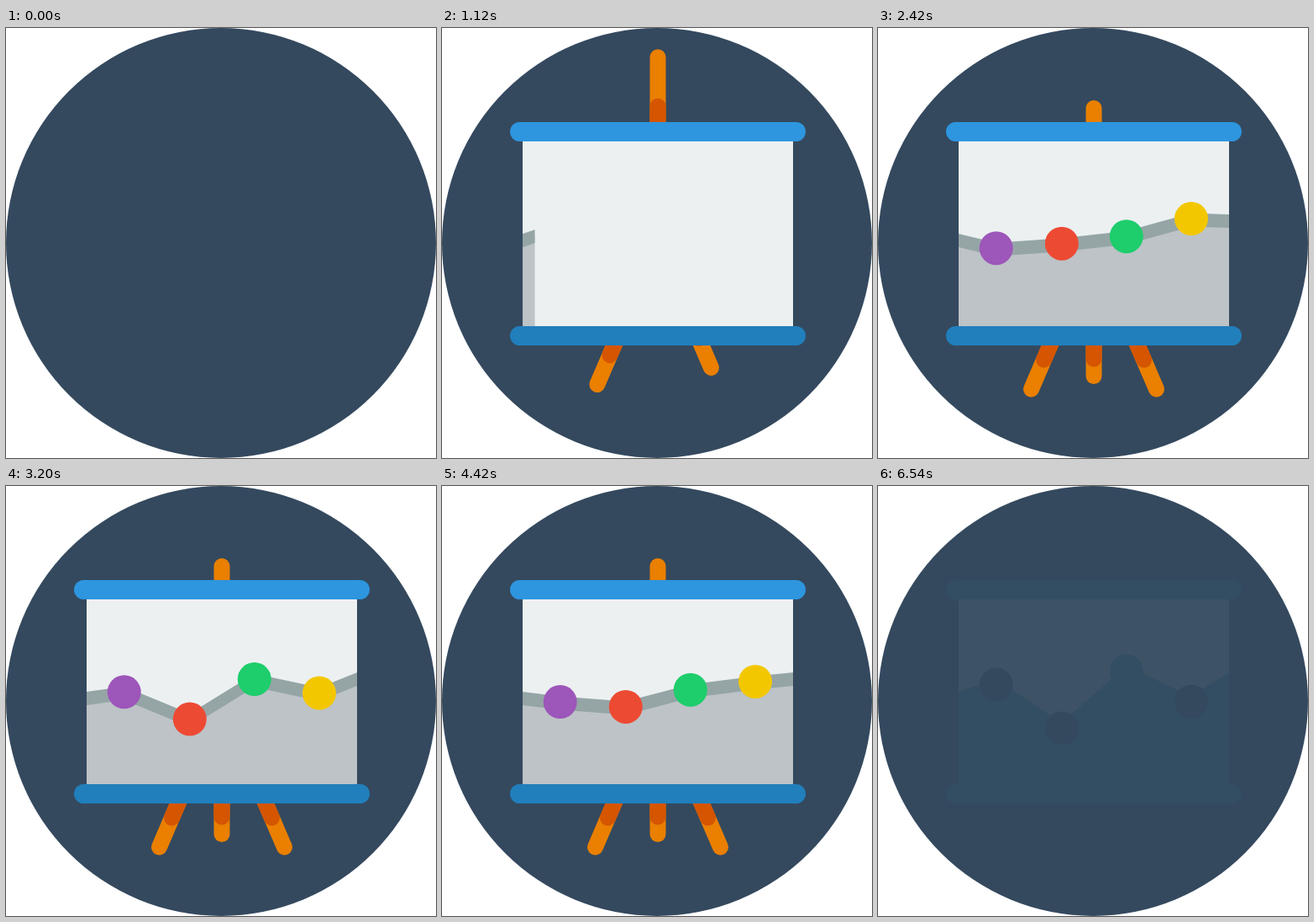
An HTML page with a canvas for the animation above (7.2 s loop, 512 px wide and 512 px high).

```html
<!DOCTYPE html>
<html lang="en">
<head>
<meta charset="utf-8">
<title>Presentation chart</title>
<style>
  html, body { margin: 0; width: 100%; height: 100%; overflow: hidden; background: #fff; }
  canvas { display: block; width: 512px; height: 512px; }
</style>
</head>
<body>
<canvas id="stage" width="512" height="512"></canvas>
<script>
const ctx = document.getElementById('stage').getContext('2d');
const LOOP = 7200, MID = 257, BG = '#34495e';
const FADE_START = 6000, FADE_TIME = 600, GHOST_START = 6540;

const FULL = {
  top: '#2d96df', bottom: '#217fbc', sheet: '#ecf0f1', area: '#bdc3c7', line: '#95a5a6',
  dots: ['#9d56b9', '#ed4a34', '#1ecd6b', '#f3c700']
};
// Faint remains of the board after the fade
const GHOST = {
  top: '#334e62', bottom: '#334e62', sheet: '#3e5266', area: '#334e62', line: '#334e62',
  dots: [BG, BG, '#334e62', BG]
};

// Rest position and swing of each chart point
const POINTS = [
  { x: 140.7, y: 236.5, swing: 50 },
  { x: 218.8, y: 288.5, swing: -62 },
  { x: 295.8, y: 220.5, swing: 54 },
  { x: 373, y: 256.8, swing: -58 }
];

// Legs: tip, far end, shaded span, sideways drift per pixel of rise
const LEGS = [
  { tip: [182.5, 430], far: [238.4, 300], shade: [[197.5, 395], [238.4, 300]], drift: 0.43 },
  { tip: [331.5, 430], far: [275.6, 300], shade: [[316.5, 395], [275.6, 300]], drift: -0.43 },
  { tip: [257, 414.5], far: [257, 95.5], shade: [[257, 394], [257, 154]], drift: 0 }
];

const span = (t, start, time) => Math.min(1, Math.max(0, (t - start) / time));
const backOut = p => 1 + 2.70158 * (p - 1) ** 3 + 1.70158 * (p - 1) ** 2;
const sineInOut = p => (1 - Math.cos(Math.PI * p)) / 2;

// Two swings there and back, slowing down over time
function swingAt(t) {
  const k = 1.77, p = span(t, 2240, 2830);
  const phase = 4 * (1 - Math.exp(-k * p)) / (1 - Math.exp(-k));
  return 1 - Math.abs(phase % 2 - 1);
}

function disc(x, y, r, color) {
  ctx.fillStyle = color;
  ctx.beginPath();
  ctx.arc(x, y, Math.max(0, r), 0, Math.PI * 2);
  ctx.fill();
}

function stick(a, b, width, color) {
  ctx.strokeStyle = color;
  ctx.lineWidth = width;
  ctx.lineCap = 'round';
  ctx.beginPath();
  ctx.moveTo(...a);
  ctx.lineTo(...b);
  ctx.stroke();
}

function polygon(points, color) {
  ctx.fillStyle = color;
  ctx.beginPath();
  points.forEach(p => ctx.lineTo(...p));
  ctx.closePath();
  ctx.fill();
}

function drawLegs(t) {
  LEGS.forEach((leg, i) => {
    const start = 770 + 141 * i;
    if (t < start) return;
    const rise = 83 * (1 - span(t, start, 470)) ** 2;
    ctx.save();
    ctx.translate(leg.drift * rise, -rise);
    stick(leg.tip, leg.far, 19, '#ea7f00');
    stick(...leg.shade, 19, '#d55500');
    ctx.restore();
  });
}

function drawChart(t, look) {
  const u = swingAt(t);
  const spots = POINTS.map(p => [p.x, p.y + p.swing * u]);
  const path = [[96, 253], ...spots.map(([x, y]) => [x, y + 1.5]), [418, 230]];
  const shift = dy => path.map(([x, y]) => [x, y + dy]);

  ctx.save();
  ctx.beginPath();
  ctx.rect(96, 135, 322 * span(t, 1103, 377), 220);
  ctx.clip();
  polygon([...path, [418, 355], [96, 355]], look.area);
  polygon([...shift(-8), ...shift(8).reverse()], look.line);
  ctx.restore();

  spots.forEach(([x, y], i) => {
    const start = 1490 + 95 * i;
    if (t > start) disc(x, y, 20 * backOut(span(t, start, 450)), look.dots[i]);
  });
}

function drawBoard(t, look) {
  const size = backOut(span(t, 0, 750));
  if (size < 0.001) return;
  ctx.save();
  ctx.translate(MID, 0);
  ctx.scale(size, 1);
  ctx.translate(-MID, 0);
  ctx.fillStyle = look.sheet;
  ctx.fillRect(96, 134, 322, 222);
  drawChart(t, look);
  stick([92.5, 123.5], [421.5, 123.5], 23, look.top);
  stick([92.5, 366.5], [421.5, 366.5], 23, look.bottom);
  ctx.restore();
}

function draw(t) {
  const ghost = t >= GHOST_START;
  ctx.clearRect(0, 0, 512, 512);
  disc(256, 256, 256, BG);
  if (!ghost) drawLegs(t);
  drawBoard(t, ghost ? GHOST : FULL);
  if (!ghost && t > FADE_START) {
    ctx.globalAlpha = sineInOut(span(t, FADE_START, FADE_TIME));
    disc(256, 256, 254, BG);
    ctx.globalAlpha = 1;
  }
}

let began;
function tick(now) {
  began ??= now;
  draw((now - began) % LOOP);
  requestAnimationFrame(tick);
}
draw(0);
requestAnimationFrame(tick);
</script>
</body>
</html>
```
